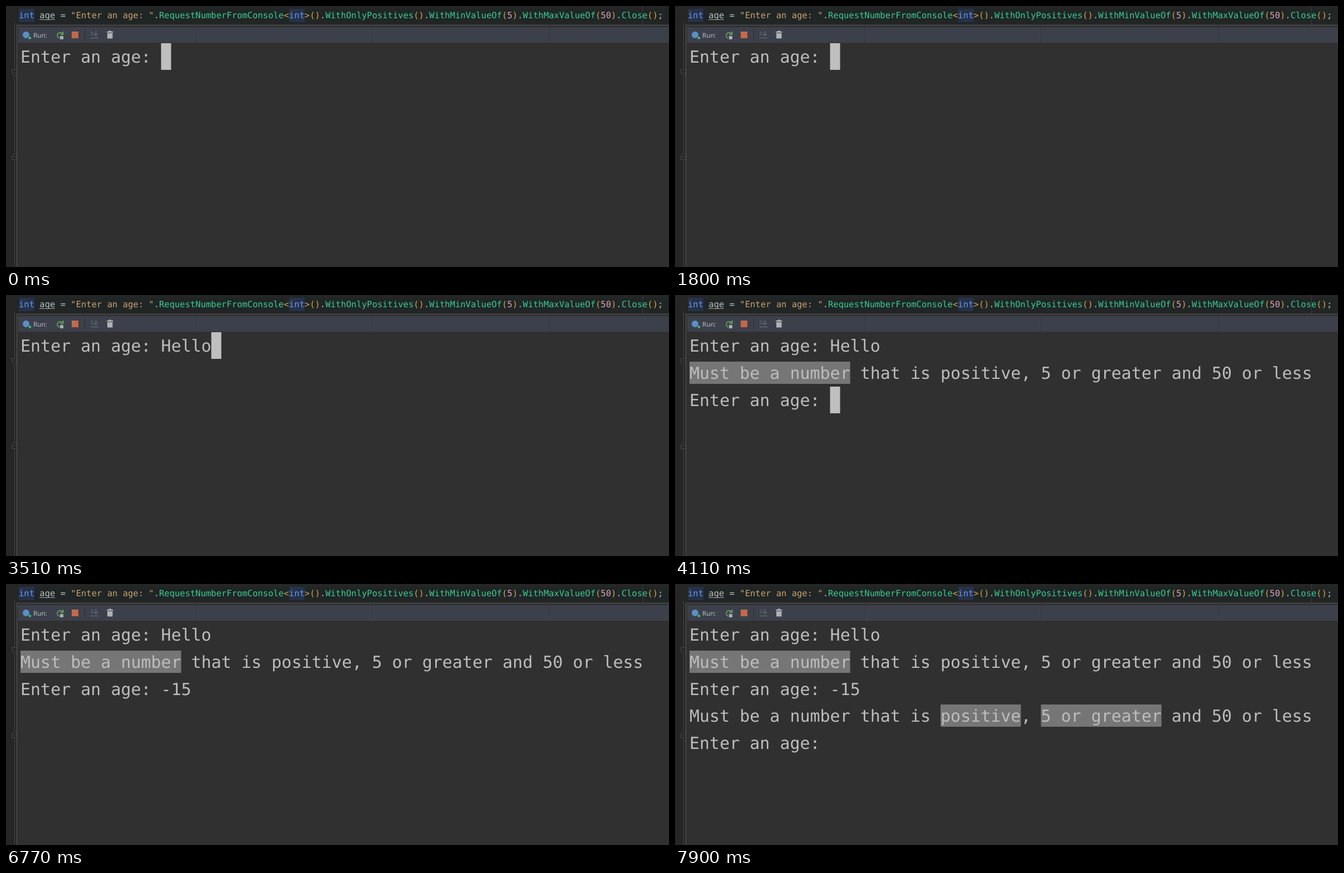
These frames come from a looping animation (1191x470 px, 8000 ms). An HTML page:

```html
<!DOCTYPE html>
<html lang="en">
<head>
<meta charset="utf-8">
<title>Console age prompt</title>
<style>
  html, body { margin: 0; width: 100%; height: 100%; overflow: hidden; background: #262626; }
  svg { display: block; width: 1191px; height: 470px; }
  text { white-space: pre; text-rendering: geometricPrecision; font-variant-ligatures: none; }
  .code { font: 15.51px "DejaVu Sans Mono", monospace; fill: #bdbdbd; }
  .key { fill: #6c95eb; }
  .str { fill: #c9a26d; }
  .fn { fill: #39cc8f; }
  .par { fill: #d9a343; }
  .num { fill: #d9a4b4; }
  .label { font: 11.6px "Noto Sans", "Open Sans", sans-serif; fill: #bbbdc0; }
  .row { font: 29.97px "DejaVu Sans Mono", monospace; fill: #bdbdbd; }
  .mark { fill: #767676; }
</style>
</head>
<body>
<svg viewBox="0 0 1191 470">
  <!-- editor line -->
  <rect x="20" y="5" width="1171" height="25" fill="#202526"/>
  <path d="M1143.5 0V34" stroke="#3a3d3d"/>
  <path d="M23 5h28v24h-28zM508.500 5h28v24h-28z" fill="#25324a"/>
  <text class="code" x="23" y="22"><tspan class="key">int</tspan> age = <tspan class="str">"Enter an age: "</tspan>.<tspan class="fn">RequestNumberFromConsole</tspan><tspan class="par">&lt;</tspan><tspan class="key">int</tspan><tspan class="par">&gt;()</tspan>.<tspan class="fn">WithOnlyPositives</tspan><tspan class="par">()</tspan>.<tspan class="fn">WithMinValueOf</tspan><tspan class="par">(</tspan><tspan class="num">5</tspan><tspan class="par">)</tspan>.<tspan class="fn">WithMaxValueOf</tspan><tspan class="par">(</tspan><tspan class="num">50</tspan><tspan class="par">)</tspan>.<tspan class="fn">Close</tspan><tspan class="par">()</tspan>;</text>
  <path d="M60 24.500h28" stroke="#a8a8a8"/>

  <!-- gutter -->
  <g fill="#262626" stroke="#484848">
    <path d="M15.500 30V470"/>
    <path d="M10.500 114.500h9v7l-4.500 4-4.500-4zM12.500 119.500h6"/>
    <path d="M10.500 276.500h9v-7l-4.500-4-4.500 4zM12.500 271.500h6"/>
  </g>

  <!-- console panel -->
  <rect x="19" y="34" width="1172" height="436" fill="#303030"/>
  <path d="M1191 34.500H19.500V470" fill="none" stroke="#5a5a5a"/>
  <rect x="22" y="38" width="1169" height="28" fill="#3c404b"/>
  <path d="M340.500 38v28M657.500 38v28M976.500 38v28" stroke="#343842"/>
  <path d="M141.500 42v20" stroke="#2c2f35"/>

  <!-- toolbar -->
  <circle cx="36" cy="52" r="6" fill="#5b8fc4"/>
  <circle cx="43" cy="57.500" r="2.200" fill="#45c46a"/>
  <text class="label" x="49" y="57">Run:</text>
  <path d="M95.500 58A5.200 5.200 0 1 1 101 49.500" fill="none" stroke="#5f9a55" stroke-width="2"/>
  <path d="M103.500 45v7h-7z" fill="#5f9a55"/>
  <rect x="97" y="54" width="6" height="6" fill="#a9acb0"/>
  <rect x="118" y="46" width="12" height="12" fill="#c4694a"/>
  <path d="M152 47.500h5M152 51.500h5M152 57.500h14M161.500 45v8M158 50l3.500 3.500 3.500-3.500" fill="none" stroke="#60646b" stroke-width="1.700"/>
  <path d="M181 46h3.500v-1.500h4.500v1.500h3.500v2h-11.500zM182 49h9.500v9.500h-9.500z" fill="#afb1b3"/>

  <g id="console"></g>
</svg>
<script>
const LOOP = 8000, LEFT = 26, TOP = 67, CELL = 18.04, PITCH = 48.8;
const PROMPT = "Enter an age: ";
const ERROR = "Must be a number that is positive, 5 or greater and 50 or less";

// time, prompt index, typed text, cursor shown
const steps = [
  [0, 0, "", 1], [260, 0, "", 0], [740, 0, "", 1], [1270, 0, "", 0], [1800, 0, "", 1],
  [2000, 0, "H", 1], [2460, 0, "H", 0], [2590, 0, "He", 1], [2920, 0, "Hel", 1],
  [3250, 0, "Hell", 1], [3510, 0, "Hello", 1],
  [4110, 1, "", 1], [4640, 1, "", 0], [5170, 1, "", 1],
  [5630, 1, "-", 1], [5960, 1, "-1", 1], [6290, 1, "-15", 1], [6770, 1, "-15", 0],
  [6840, 2, "", 1], [7900, 2, "", 0]
];
const answers = ["Hello", "-15"];
const marked = [["Must be a number"], ["positive", "5 or greater"]];

const view = document.getElementById("console");

function add(tag, attrs, parent = view) {
  const el = document.createElementNS("http://www.w3.org/2000/svg", tag);
  for (const name in attrs) el.setAttribute(name, attrs[name]);
  return parent.appendChild(el);
}

const rowTop = row => TOP + Math.round(row * PITCH);
const addText = (row, parent) => add("text", { class: "row", x: LEFT, y: rowTop(row) + 35 }, parent);

const prompts = [0, 2, 4].map(row => addText(row));
const errors = marked.map((phrases, i) => {
  const row = i * 2 + 1, group = add("g", {});
  for (const phrase of phrases) {
    add("rect", {
      class: "mark", x: LEFT + ERROR.indexOf(phrase) * CELL, y: rowTop(row) + 4,
      width: phrase.length * CELL, height: 40
    }, group);
  }
  addText(row, group).textContent = ERROR;
  return group;
});
const cursor = add("rect", { width: 18, height: 48, fill: "#bfbfbf" });

const show = (el, on) => el.setAttribute("visibility", on ? "visible" : "hidden");

let shown;
function draw() {
  const time = performance.now() % LOOP;
  const step = steps.findLast(s => s[0] <= time);
  if (step !== shown) {
    shown = step;
    const [, active, typed, on] = step;
    prompts.forEach((el, i) => {
      el.textContent = i > active ? "" : PROMPT + (i < active ? answers[i] : typed);
    });
    errors.forEach((el, i) => show(el, i < active));
    cursor.setAttribute("x", LEFT + (PROMPT.length + typed.length) * CELL);
    cursor.setAttribute("y", rowTop(active * 2));
    show(cursor, on);
  }
  requestAnimationFrame(draw);
}
draw();
</script>
</body>
</html>
```
